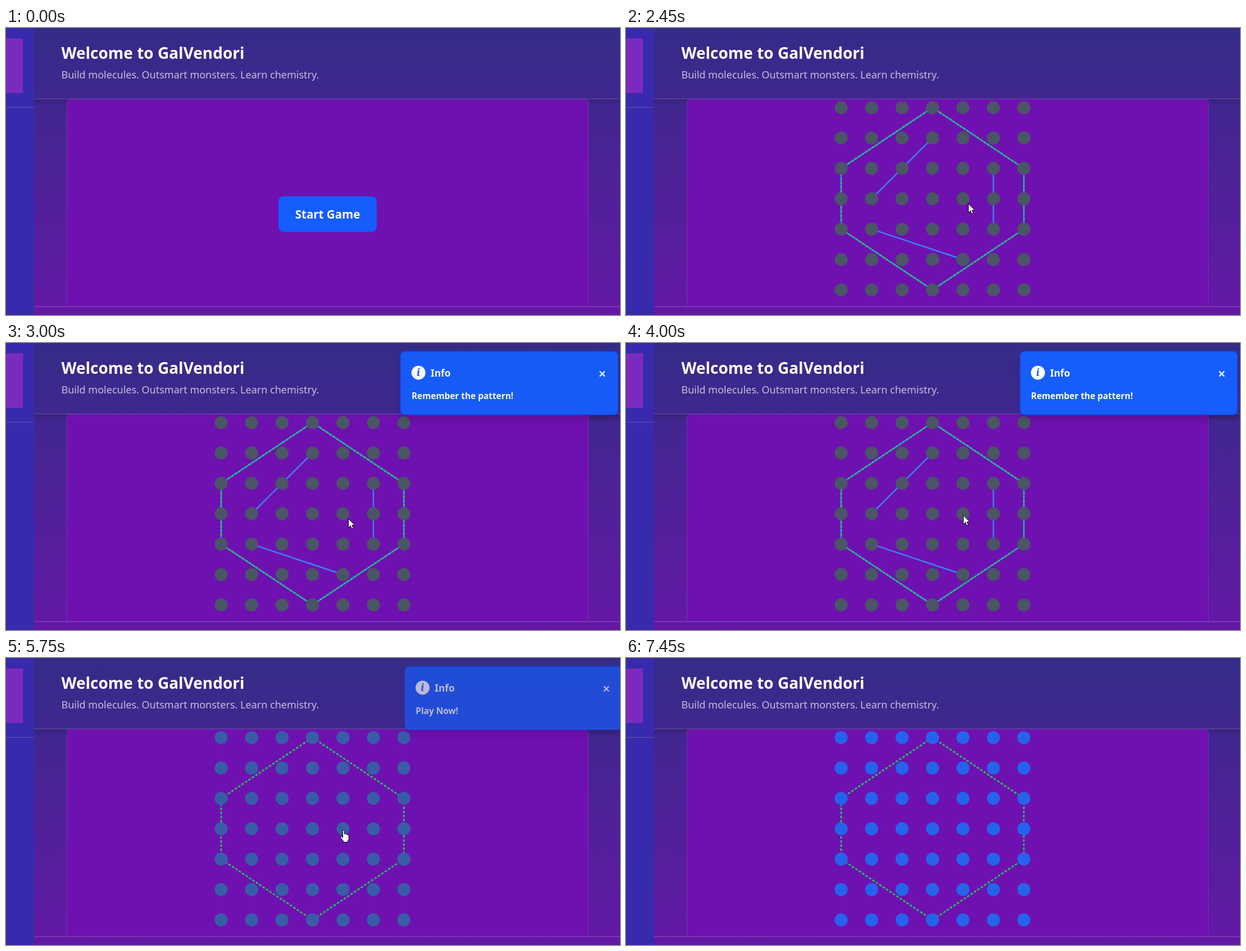
Recreate the animation shown at these times as an HTML page. Size 1093x512 px, loop 7500 ms.

```html
<!DOCTYPE html>
<html lang="en">
<head>
<meta charset="utf-8">
<title>Pattern game</title>
<style>
  html, body { margin: 0; width: 100%; height: 100%; overflow: hidden; background: #342c87; }
  svg { display: block; width: 100vw; height: 100vh; }
  text { font-family: "Noto Sans", "Open Sans", sans-serif; fill: #fff; }
  .bold { font-weight: 700; }
  .semi { font-weight: 600; }
  .cursor { fill: #fff; stroke: #000; stroke-width: 1; stroke-linejoin: round; }
</style>
</head>
<body>
<svg viewBox="0 0 1093 512" preserveAspectRatio="none">
  <defs>
    <linearGradient id="page" x2="0" y2="1">
      <stop stop-color="#342c87"/>
      <stop offset="1" stop-color="#6418a6"/>
    </linearGradient>
    <linearGradient id="shade" x2="0" y2="1">
      <stop stop-color="#000" stop-opacity=".13"/>
      <stop offset="1" stop-color="#000" stop-opacity="0"/>
    </linearGradient>
    <clipPath id="main"><path d="M50 126H1093V497H50Z"/></clipPath>
    <filter id="shadow" x="-10%" y="-20%" width="120%" height="160%">
      <feDropShadow dx="0" dy="8" stdDeviation="6" flood-color="#000" flood-opacity=".14"/>
    </filter>
  </defs>

  <rect width="1093" height="512" fill="url(#page)"/>
  <rect x="50" y="127" width="1043" height="12" fill="url(#shade)"/>
  <g clip-path="url(#main)">
    <rect x="108.5" y="125.5" width="928" height="420" rx="8" fill="#6e11b0" stroke="#812bb9"/>
  </g>
  <path d="M50 126.5H1093" stroke="#6553a1"/>
  <path d="M50 497H1093" stroke="#7b34b4" stroke-width="2"/>

  <rect width="50" height="512" fill="#372aac"/>
  <path d="M0 141.5H50" stroke="#5f55bd"/>
  <rect y="18.5" width="30.3" height="97.5" fill="#7a2bbd"/>

  <text class="bold" x="98.5" y="55" font-size="28">Welcome to GalVendori</text>
  <text x="98.5" y="89.5" font-size="18" fill-opacity=".7">Build molecules. Outsmart monsters. Learn chemistry.</text>

  <g id="button">
    <rect id="buttonFace" x="485" y="300.3" width="175" height="63.4" rx="9"/>
    <text class="bold" x="572.5" y="340" font-size="20.5" text-anchor="middle">Start Game</text>
  </g>

  <g id="board" fill="none" stroke-width="2.4">
    <path id="pattern" stroke="#3b82f6"/>
    <path id="outline" stroke="#22c55e" stroke-width="2.8" stroke-dasharray="4.4 2.9"/>
    <g id="dots"></g>
  </g>

  <g id="toast">
    <rect x="701.5" y="15" width="387" height="113" rx="8" fill="#155dfc" stroke="#1447e6" stroke-width="1.5" filter="url(#shadow)"/>
    <circle cx="733.3" cy="53" r="12.5" fill="#fff"/>
    <text x="733" y="59" text-anchor="middle" style="font:italic 700 18px 'Noto Serif',serif;fill:#155dfc">i</text>
    <text class="bold" x="755" y="59.5" font-size="17.3">Info</text>
    <text class="semi" id="message" x="721" y="100" font-size="15.4"></text>
    <path d="M1056 50.5l9 9m0-9l-9 9" stroke="#fff" stroke-width="2.2"/>
  </g>

  <g id="pointer">
    <path id="arrow" class="cursor" d="M.5.5V16.5L4.2 13 6.7 18.6 9.3 17.5 6.9 12H11.8Z"/>
    <path id="hand" class="cursor" d="M-.5 1.2Q1-.8 2.5 1.2V7Q4.5 5.7 5.5 7.5 7.3 6.6 8 8.5 10.3 8 10.3 10.5V15Q10 18 8.5 19V21.5H.5V19.5Q-1.5 17-4.5 13.3-5.3 11.2-3.2 11.2L-.5 13.3Z"/>
  </g>
</svg>
<script>
const LOOP = 7500, STEP = 50;
const PITCH = 54.2, LEFT = 383, TOP = 142;
const GREY = [74, 85, 101], BLUE = [37, 99, 235];
const BUTTON = [21, 93, 252], BUTTON_HOVER = [20, 71, 230];
const TOASTS = [
  { text: "Remember the pattern!", start: 2545, end: 4500 },
  { text: "Play Now!", start: 5515, end: 7450 }
];

// time, x, y of the pointer tip
const TRACK = [
  [150, 699, -4], [350, 668, 80], [500, 650, 125], [650, 630, 190], [800, 613, 255],
  [900, 610, 274], [1000, 610, 291], [1200, 609, 306], [1400, 609, 313],
  [3500, 609, 313], [3850, 600, 308], [3950, 600, 308], [4000, 600, 307],
  [6500, 600, 307], [6700, 598, 285], [6900, 600, 220], [7050, 603, 160],
  [7200, 625, 80], [7350, 657, -4]
];

const $ = id => document.getElementById(id);
const clamp = v => Math.max(0, Math.min(1, v));
const progress = (t, start, length) => clamp((t - start) / length);
const mix = (a, b, p) => a + (b - a) * p;
const blend = (a, b, p) => `rgb(${a.map((v, i) => Math.round(mix(v, b[i], p)))})`;
const show = (id, on) => $(id).setAttribute("visibility", on ? "visible" : "hidden");
const node = (col, row) => [LEFT + col * PITCH, TOP + row * PITCH];
const line = points => "M" + points.map(p => node(...p).join(" ")).join("L");

// CSS "ease" curve
function ease(x) {
  let low = 0, high = 1;
  const bezier = (a, b, s) => 3 * a * s * (1 - s) ** 2 + 3 * b * s * s * (1 - s) + s ** 3;
  for (let i = 0; i < 20; i++) {
    const mid = (low + high) / 2;
    if (bezier(.25, .25, mid) < x) low = mid; else high = mid;
  }
  return bezier(.1, 1, low);
}

// Each side is its own segment, so the dashes restart at every corner.
const corners = [[3, 0], [6, 2], [6, 4], [3, 6], [0, 4], [0, 2]];
const hexagon = corners.map((p, i) => line([p, corners[(i + 1) % 6]])).join("");
$("outline").setAttribute("d", hexagon);
$("pattern").setAttribute("d", hexagon +
  line([[3, 1], [1, 3]]) + line([[5, 2], [5, 4]]) + line([[1, 4], [4, 5]]));

for (let i = 0; i < 49; i++) {
  const dot = document.createElementNS("http://www.w3.org/2000/svg", "circle");
  const [x, y] = node(i % 7, Math.floor(i / 7));
  dot.setAttribute("cx", x);
  dot.setAttribute("cy", y);
  dot.setAttribute("r", 11.6);
  $("dots").append(dot);
}

function pointerAt(t) {
  const next = TRACK.findIndex(key => key[0] >= t);
  if (next < 0) return TRACK[TRACK.length - 1].slice(1);
  if (next === 0) return TRACK[0].slice(1);
  const a = TRACK[next - 1], b = TRACK[next];
  const p = progress(t, a[0], b[0] - a[0]);
  return [mix(a[1], b[1], p), mix(a[2], b[2], p)];
}

function overDot(x, y) {
  const col = Math.round((x - LEFT) / PITCH), row = Math.round((y - TOP) / PITCH);
  const [cx, cy] = node(col, Math.max(0, row));
  return Math.hypot(x - cx, y - cy) < 11.6;
}

function drawToast(t) {
  const toast = TOASTS.find(({ start, end }) => t >= start && t < end);
  show("toast", toast);
  if (!toast) return;
  const p = ease(progress(t, toast.start, 600));
  $("toast").setAttribute("opacity", p);
  $("toast").setAttribute("transform", `translate(${25 * (1 - p)} 0)`);
  $("message").textContent = toast.text;
}

function drawPointer(t) {
  const [x, y] = pointerAt(t);
  const onButton = t < 2450 && y >= 300;
  const onDot = t >= 5450 && overDot(x, y);
  const visible = t >= 150 && t < 7400;
  $("pointer").setAttribute("transform", `translate(${x} ${y})`);
  show("hand", visible && (onButton || onDot));
  show("arrow", visible && !(onButton || onDot));
}

function draw(t) {
  show("button", t < 2450);
  $("buttonFace").setAttribute("fill", blend(BUTTON, BUTTON_HOVER, ease(progress(t, 1100, 150))));
  $("board").style.display = t >= 2450 ? "" : "none";
  show("pattern", t < 5500);
  $("dots").setAttribute("fill", blend(GREY, BLUE, progress(t, 5500, 500)));
  drawToast(t);
  drawPointer(t);
}

const begin = performance.now();
function tick() {
  const t = (performance.now() - begin) % LOOP;
  draw(Math.floor(t / STEP) * STEP);
  requestAnimationFrame(tick);
}
tick();
</script>
</body>
</html>
```
